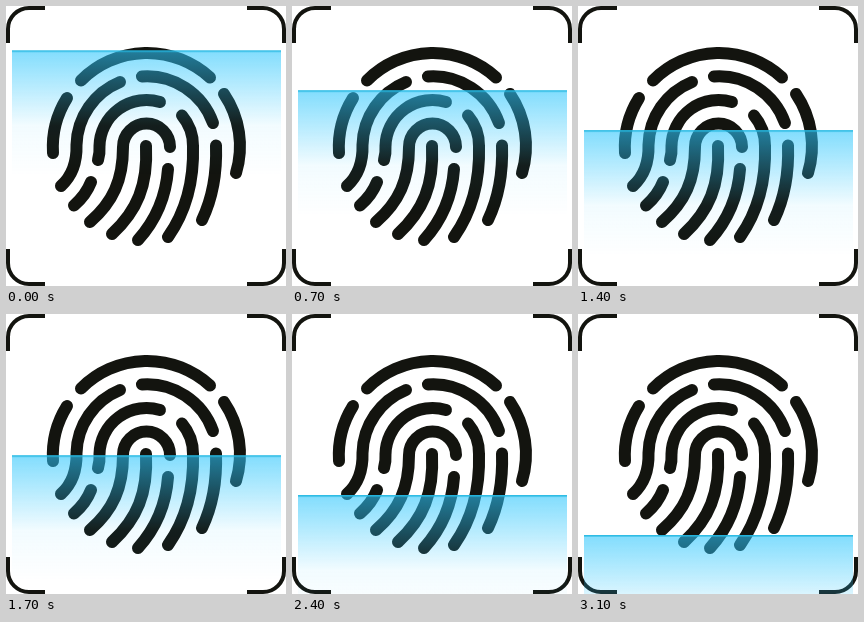
An HTML page without scripts that plays this animation: 280 px wide and 280 px high, repeating every 3200 ms.

```html
<!DOCTYPE html>
<html lang="en">
<head>
<meta charset="utf-8">
<title>Fingerprint scan</title>
<style>
  html, body { margin: 0; width: 100%; height: 100%; overflow: hidden; background: #fff; }
  svg { display: block; width: 100%; height: 100%; }
  .ink { fill: none; stroke: #13140f; stroke-linecap: round; }
  .ridges { stroke-width: 12; }
  .corners { stroke-width: 4; stroke-linecap: butt; }
  /* the beam advances ten times a second */
  .beam { animation: scan 3200ms steps(32) -4ms infinite; }
  @keyframes scan {
    from { transform: translateY(44.3px); }
    to { transform: translateY(226.7px); }
  }
</style>
</head>
<body>
<svg viewBox="0 0 280 280">
  <defs>
    <linearGradient id="glow" x1="0" y1="0" x2="0" y2="1">
      <stop offset="0" stop-color="#2dc6fc" stop-opacity=".6"/>
      <stop offset=".6" stop-color="#2dc6fc" stop-opacity=".06"/>
      <stop offset="1" stop-color="#2dc6fc" stop-opacity="0"/>
    </linearGradient>
    <path id="corner" d="M2 37V23A21 21 0 0 1 23 2H39"/>
  </defs>

  <g class="ink corners">
    <use href="#corner"/>
    <use href="#corner" transform="matrix(-1 0 0 1 280 0)"/>
    <use href="#corner" transform="matrix(1 0 0 -1 0 280)"/>
    <use href="#corner" transform="rotate(180 140 140)"/>
  </g>

  <g class="ink ridges">
    <!-- outer ring -->
    <path d="M75 74.500A93 93 0 0 1 204 71.500"/>
    <path d="M61 92A93 93 0 0 0 47 147"/>
    <path d="M218 88A93 93 0 0 1 230 167"/>
    <!-- second ring -->
    <path d="M114 76A70 70 0 0 0 70.500 139C71 156 66 170 55 180"/>
    <path d="M136 70.500A70 70 0 0 1 207 117"/>
    <path d="M210 139.500C211 168 207 191 196 214"/>
    <!-- third ring -->
    <path d="M154 96A47 47 0 0 0 93.500 140Q94 147 92 154"/>
    <path d="M176 109.500A47 47 0 0 1 187 140C188 174 181 204 162 231"/>
    <path d="M85 176Q80 189 68 199.500"/>
    <!-- core -->
    <path d="M164 141A23.500 23.500 0 1 0 117 141C117 174 107 196 84 216"/>
    <path d="M140 140C142 179 131 205 106 228"/>
    <path d="M162 163C160 191 150 214 132 234"/>
  </g>

  <g class="beam">
    <rect x="6" width="269" height="126" fill="url(#glow)"/>
    <rect x="6" width="269" height="1.600" fill="#26b8e2" opacity=".9"/>
  </g>
</svg>
</body>
</html>
```
